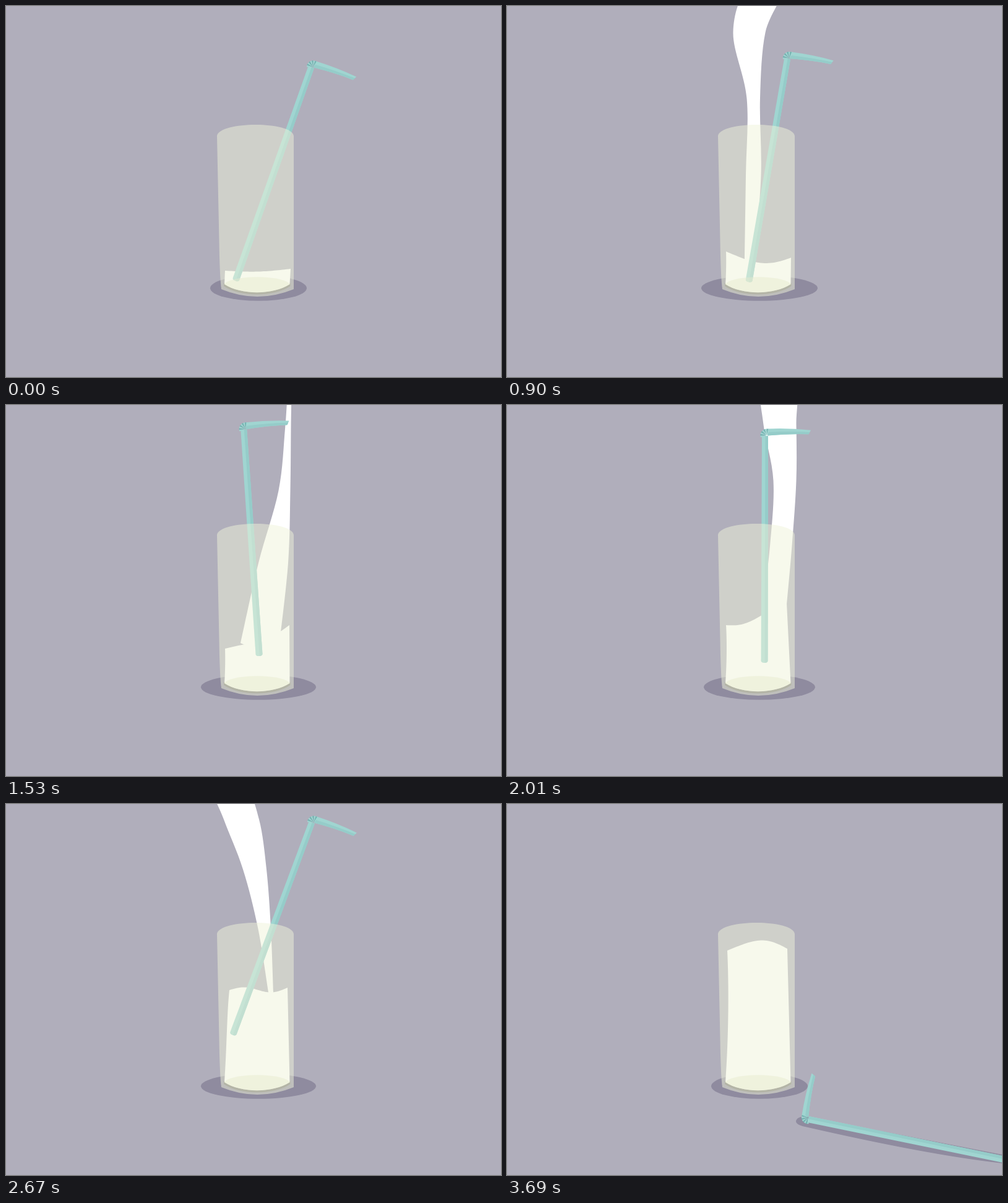
An HTML page with a canvas for the animation above (4020 ms loop, 800 px wide and 600 px high).

```html
<!DOCTYPE html>
<html lang="en">
<head>
<meta charset="utf-8">
<title>Glass of milk</title>
<style>
  html, body { margin: 0; width: 100%; height: 100%; overflow: hidden; background: #b0aebb; }
  canvas { display: block; width: 800px; height: 600px; }
</style>
</head>
<body>
<canvas id="stage" width="800" height="600"></canvas>
<script>
const ctx = document.getElementById('stage').getContext('2d');
const LOOP = 4020, STEP = 30, END = 3690;
const TOSS = 3180, POUR_START = 450, POUR_END = 3440;
const clamp = v => Math.max(0, Math.min(1, v));
const mix = (a, b, u) => a + (b - a) * u;

// Swing of the straw in the glass: time, centre x, centre y, degrees
const SWING = [
  [0, 433.4, 267.9, 19.5],
  [540, 432.5, 268, 18.5],
  [900, 422.6, 261.8, 9.8],
  [1530, 396.5, 219, -3.9],
  [2010, 416.5, 229.5, 0.15],
  [2670, 431.7, 197.9, 20.4],
  [TOSS, 514.9, 163.7, 58.4]
];

// Milk surface: time, left x, right x, left y, right y, swell, slosh
const SURFACE = [
  [570, 354, 460, 428, 425, 3, 0],
  [900, 354, 459, 397, 407, 13, -1],
  [1530, 354, 458, 394, 356, 8, -2],
  [2010, 354, 452, 356, 320, 7, 3],
  [2670, 361, 455, 301, 297, 2, -5],
  [3180, 349, 461, 262, 281, -13, 0],
  [END, 356, 453, 237, 234, -14.5, 1.4]
];

// Pour: time, bottom y, then the left and the right edge from top to bottom
const column = (time, bottom, left, right) =>
  [time, bottom, ...Array(5).fill(left), ...Array(5).fill(right)];
const POUR = [
  column(POUR_START, -5, 390, 406),
  [900, 412, 390, 365.5, 387.5, 386, 384, 446, 417.5, 409, 410.5, 400],
  [1530, 385, 456, 451, 440.5, 408, 379, 461, 460.5, 459.5, 456, 442],
  [2010, 345, 413, 414.5, 430.5, 425, 411, 465, 467.5, 467.5, 460.5, 450],
  [2670, 304, 334, 352, 383, 407, 424, 385, 409, 421, 428, 432],
  [3180, 275, 418, 372, 382, 416, 424, 445, 459, 455, 445.5, 447],
  column(POUR_END, 290, 426, 440)
];

// Smooth interpolation between rows, without overshoot.
function sample(rows, t) {
  const last = rows.length - 1;
  if (t <= rows[0][0]) return rows[0].slice(1);
  if (t >= rows[last][0]) return rows[last].slice(1);
  const i = rows.findIndex(row => row[0] > t) - 1;
  const a = rows[i], b = rows[i + 1], span = b[0] - a[0], u = (t - a[0]) / span;
  const rate = (j, c) => (rows[j + 1][c] - rows[j][c]) / (rows[j + 1][0] - rows[j][0]);
  const slope = (j, c) => {
    if (j === 0) return rate(0, c);
    if (j === last) return rate(last - 1, c);
    const p = rate(j - 1, c), q = rate(j, c);
    return p * q > 0 ? 2 * p * q / (p + q) : 0;
  };
  return a.slice(1).map((from, k) => {
    const c = k + 1, m0 = slope(i, c) * span, m1 = slope(i + 1, c) * span;
    return mix(from, b[c], u * u * (3 - 2 * u)) + m0 * u * (1 - u) ** 2 - m1 * u * u * (1 - u);
  });
}

function curveThrough(points) {
  for (let i = 0; i < points.length - 1; i++) {
    const p = points[i], q = points[i + 1];
    const before = points[i - 1] || p, after = points[i + 2] || q;
    ctx.bezierCurveTo(
      p[0] + (q[0] - before[0]) / 6, p[1] + (q[1] - before[1]) / 6,
      q[0] - (after[0] - p[0]) / 6, q[1] - (after[1] - p[1]) / 6, q[0], q[1]);
  }
}

function fillPath(path, color) {
  ctx.fillStyle = color;
  ctx.fill(new Path2D(path));
}

function drawShadows(t) {
  let grow = 0;
  if (t > 600 && t < 3600) {
    const line = 1 - Math.abs((t % 600) - 300) / 300;
    grow = (line + (1 - Math.cos(Math.PI * line)) / 2) / 2;
  }
  ctx.fillStyle = '#8f8b9f';
  ctx.beginPath();
  ctx.ellipse(408, 456.3, 78 + 16 * grow, 20.5, 0, 0, Math.PI * 2);
  ctx.fill();

  ctx.globalAlpha = clamp((t - 3510) / 180);
  fillPath('M482 505L820 571V583Q700 572 482 522Q467 519 467 513Q468 506 482 505Z', '#8f8b9f');
  ctx.globalAlpha = 1;
}

function drawPour(t) {
  if (t <= POUR_START || t >= POUR_END) return;
  const [bottom, ...edges] = sample(POUR, t);
  const top = -30 + 106 * (Math.max(0, t - 2800) / 380) ** 2;
  const points = edges.map((x, i) => [x, mix(top, bottom, ((i % 5) / 4) ** 1.3)]);
  const outline = [...points.slice(0, 5).reverse(), ...points.slice(5)];
  ctx.fillStyle = '#fff';
  ctx.beginPath();
  ctx.moveTo(...outline[0]);
  curveThrough(outline);
  ctx.quadraticCurveTo((edges[4] + edges[9]) / 2, bottom + 16, ...outline[0]);
  ctx.fill();
}

function drawMilk(t) {
  const [left, right, leftY, rightY, swell, slosh] = sample(SURFACE, t);
  const height = 450 - leftY, bulge = 353 + height / 38;
  ctx.fillStyle = '#fff';
  ctx.beginPath();
  ctx.moveTo(353, 450);
  ctx.bezierCurveTo(bulge, 450 - height * 0.35, bulge, 450 - height * 0.75, left, leftY);
  for (let u = 0; u <= 1; u += 1 / 32) {
    const wave = swell * Math.sin(Math.PI * u) + slosh * Math.sin(2 * Math.PI * u);
    ctx.lineTo(mix(left, right, u), mix(leftY, rightY, u) + wave);
  }
  ctx.lineTo(458.5, 450);
  ctx.bezierCurveTo(432, 467.5, 379, 467.5, 353, 450);
  ctx.fill();
}

function strawPose(t) {
  if (t <= TOSS) return sample(SWING, t);
  const [x, y, angle] = sample(SWING, TOSS), u = (t - TOSS) / (END - TOSS);
  return [mix(x, 662.7, u), mix(y, 546.1, u ** 1.7), mix(angle, 281.6, u ** 1.58)];
}

function drawStraw(t) {
  const [x, y, angle] = strawPose(t);
  const light = '#a0d5d1', dark = '#95ccc9';
  ctx.save();
  ctx.translate(x, y);
  ctx.rotate(angle * Math.PI / 180);
  ctx.translate(0, -184.5);
  fillPath('M-5 5H5L5.5 369Q5 372 0 372Q-5 372 -5.5 369Z', light);
  fillPath('M0.5 5H5L5.5 369Q5 372 0.5 372Z', dark);
  fillPath('M4 -6.5Q40 -8 74 -4.5L70.5 2Q38 1 4 4.5Z', light);
  fillPath('M4 -1Q40 -3 72.5 -1.5L70.5 2Q38 1 4 4.5Z', dark);

  // Pleated elbow
  const pleat = Math.PI / 12;
  for (let i = 0; i < 9; i++) {
    const from = Math.PI * 0.9 + i * pleat;
    ctx.fillStyle = i % 2 ? '#72b5b2' : light;
    ctx.beginPath();
    ctx.moveTo(3, 4);
    ctx.arc(3, 4, 10.5, from, from + pleat);
    ctx.fill();
  }
  ctx.restore();
}

function drawGlass() {
  fillPath('M341 210C345 186 462 186 465 210V458Q406 482 348 458Q345.5 440 344.5 380Z',
    'rgba(239,243,217,.5)');
  fillPath('M353 450A53 13 0 0 1 458.5 450C432 467.5 379 467.5 353 450Z',
    'rgba(231,235,208,.5)');
}

function draw(t) {
  ctx.fillStyle = '#b0aebb';
  ctx.fillRect(0, 0, 800, 600);
  drawShadows(t);
  fillPath('M352 448V453C378 471 433 471 459.5 453V448Z', '#797774');
  drawPour(t);
  drawMilk(t);
  drawStraw(t);
  drawGlass();
}

const start = performance.now();
function tick() {
  const t = (performance.now() - start) % LOOP;
  draw(Math.min(END, Math.floor(t / STEP) * STEP));
  requestAnimationFrame(tick);
}
tick();
</script>
</body>
</html>
```
